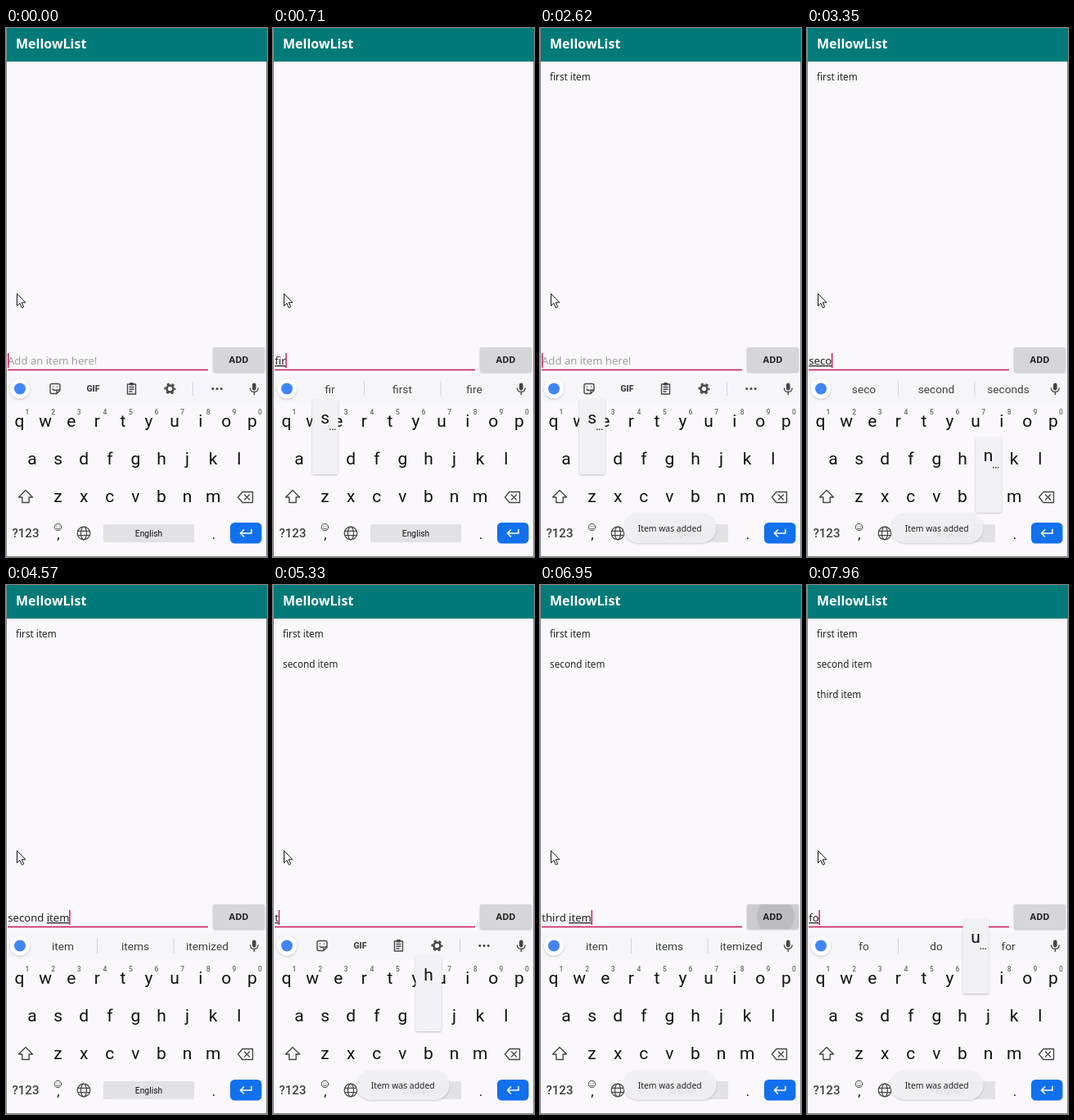
Write an HTML page that moves like this. It is 319 by 646 pixels and loops after 8000 ms.

```html
<!DOCTYPE html>
<html lang="en">
<head>
<meta charset="utf-8">
<title>To-do list</title>
<style>
  html, body { margin: 0; width: 100%; height: 100%; overflow: hidden; background: #faf8fc; }
  svg { display: block; width: 100%; height: 100%; }
  text { white-space: pre; }
  .app { font-family: "Noto Sans", sans-serif; fill: #222; }
  .kb { font-family: Roboto, sans-serif; fill: #111; }
  .mid { text-anchor: middle; }
  .key { font-size: 21px; }
  .hint { font-size: 8.5px; font-weight: 500; fill: #666; }
  .word { font-size: 13.7px; fill: #3c4043; }
  .line { fill: none; stroke: #444649; stroke-width: 1.4; stroke-linejoin: round; stroke-linecap: round; }
  .solid { fill: #444649; }
  .rule { stroke: #d3d3d9; stroke-width: 1; }
</style>
</head>
<body>
<svg viewBox="0 0 319 646">
  <defs>
    <filter id="shadow" x="-30%" y="-30%" width="160%" height="160%">
      <feDropShadow dx="0" dy="1" stdDeviation="1.2" flood-opacity=".25"/>
    </filter>
    <clipPath id="face"><rect x="253" y="390" width="63" height="30" rx="2"/></clipPath>
  </defs>

  <rect width="319" height="646" fill="#faf8fc"/>
  <path d="M.5 0v646M318.500 0v646M0 645.500h319" stroke="#85838a"/>
  <rect x="1" width="318" height="41" fill="#007a78"/>
  <text class="app" x="12" y="25" font-size="16" font-weight="700" style="fill:#fff">MellowList</text>
  <g id="list"></g>

  <text class="app" id="holder" x="2" y="411" font-size="13.100" style="fill:#a09ea3">Add an item here!</text>
  <text class="app" id="input" x="2.3" y="411" font-size="13.1"><tspan id="done"></tspan><tspan id="word" text-decoration="underline"></tspan></text>
  <rect x="2" y="416.700" width="245" height="1.600" fill="#c8235a"/>
  <rect id="caret" y="397" width="1.5" height="18" fill="#d01f56"/>

  <rect id="button" x="253" y="390" width="63" height="30" rx="2" filter="url(#shadow)"/>
  <circle id="ripple" cx="288" cy="405" r="23" fill="#bcbbbe" clip-path="url(#face)"/>
  <text class="app mid" x="284.5" y="409" font-size="11" font-weight="700">ADD</text>

  <rect x="2" y="424" width="315" height="34" fill="#f6f5fa"/>
  <circle cx="17" cy="440.5" r="12" fill="#fff" filter="url(#shadow)"/>
  <circle cx="17" cy="440.5" r="7" fill="#4285f4"/>
  <g id="tools">
    <path class="line" d="M56 434.500h8q2 0 2 2v6l-4 4h-6q-2 0-2-2v-8q0-2 2-2zM66 442h-2.500q-1.500 0-1.500 1.500v3M57 441q2 2.500 4.500 1"/>
    <path class="line" d="M57.500 438h.1M62.500 438h.1"/>
    <text class="kb mid" x="106.500" y="444" font-size="10.500" font-weight="900" style="fill:#444649">GIF</text>
    <path class="line" d="M148.500 435h10v12h-10zM151 438.500h5M151 441.300h5M151 444h3"/>
    <rect class="solid" x="151" y="433" width="5" height="3.500" rx="1"/>
    <circle class="line" cx="200.500" cy="440.500" r="4" style="stroke-width:2.500"/>
    <circle class="line" cx="200.500" cy="440.500" r="6" style="stroke-width:2;stroke-linecap:butt" stroke-dasharray="3.142 3.142" stroke-dashoffset="1.570"/>
    <path class="rule" d="M228.500 432v17"/>
    <g class="solid"><circle cx="252.800" cy="440.500" r="1.500"/><circle cx="258" cy="440.500" r="1.500"/><circle cx="263.200" cy="440.500" r="1.500"/></g>
  </g>
  <g id="words">
    <path class="rule" d="M111.500 431v19M205 431v19"/>
    <text class="kb mid word" x="69.500" y="445.500"></text>
    <text class="kb mid word" x="158" y="445.500"></text>
    <text class="kb mid word" x="246" y="445.500"></text>
  </g>
  <rect class="solid" x="301" y="433.500" width="4.600" height="9" rx="2.300"/>
  <path class="line" d="M298.500 440q.3 4.500 4.800 4.500t4.800-4.500M303.300 444.500v3"/>

  <g id="keys"></g>
  <path class="line" d="M24 564.500l8.500 8.500h-4.300v6.500h-8.400v-6.500h-4.300z"/>
  <path class="line" d="M289 566.500h12.500v13h-12.500l-5.500-6.500zM291.500 570l6 6M297.500 570l-6 6"/>
  <text class="kb mid" x="24" y="622" font-size="15" font-weight="500" style="fill:#3c4043">?123</text>
  <circle class="line" cx="63.500" cy="609.500" r="4.200" style="stroke-width:1"/>
  <path class="line" d="M61.500 611q2 2 4 0M62 608.300h.1M65 608.300h.1" style="stroke-width:1"/>
  <text class="kb mid" x="64" y="624" font-size="17">,</text>
  <g class="line" style="stroke-width:1.200">
    <circle cx="95" cy="617" r="7.800"/><ellipse cx="95" cy="617" rx="3.500" ry="7.800"/>
    <path d="M88 614.300h14M88 619.700h14"/>
  </g>
  <rect id="space" x="119" y="606" width="111" height="22" rx="1.500"/>
  <text class="kb mid" x="174.500" y="621" font-size="10.300">English</text>
  <text class="kb mid" x="254" y="624" font-size="17">.</text>
  <rect x="274" y="604" width="38.500" height="25.500" rx="5.500" fill="#1170ee"/>
  <path class="line" d="M300 612.500v4.500h-13.500M290.500 613l-4 4 4 4" style="stroke:#fff;stroke-width:1.700"/>

  <g id="popup">
    <rect x="-15.500" y="-79" width="31.500" height="91.500" rx="3" fill="#f1f1f6" filter="url(#shadow)"/>
    <text class="kb mid key" y="-50"></text>
    <path class="solid" d="M5.500-43h1.600v1.600h-1.600zM8.400-43h1.600v1.600h-1.600zM11.300-43h1.600v1.600h-1.600z"/>
  </g>
  <g id="toast">
    <rect x="102" y="592.500" width="113.500" height="36" rx="18" fill="#f0eff4" filter="url(#shadow)" opacity=".9"/>
    <text class="app mid" x="158.700" y="614.500" font-size="10.400">Item was added</text>
  </g>

  <path d="M13.500 324.500v14.800l3.400-3.200 2.500 5.600 2.300-1-2.500-5.500h4.600z" fill="#fff" stroke="#111"/>
</svg>
<script>
const LOOP = 8000;
const $ = id => document.getElementById(id);
const NS = "http://www.w3.org/2000/svg";

// [time, field text, pressed key, button look]
const steps = [
  [0, ""], [130, "", "f"], [280, "f", "i"], [430, "fi", "r"], [580, "fir", "s"],
  [720, "firs", "t"], [870, "first", " "], [1020, "first i", "t"], [1160, "first it", "e"],
  [1310, "first ite", "m"], [1440, "first item"],
  [1740, "", "", "down"], [1890, "", "", "fade"], [2030, ""],
  [2620, "", "s"], [2770, "s"], [2910, "s", "e"], [3060, "se", "c"], [3200, "sec", "o"],
  [3350, "seco", "n"], [3510, "secon", "d"], [3660, "second"], [3810, "second", " "],
  [3960, "second ", "i"], [4120, "second i", "t"], [4270, "second it", "e"],
  [4420, "second ite", "m"], [4570, "second item"], [4730, "second item", "", "ripple"],
  [4880, "", "", "down"], [5030, "", "", "fade"],
  [5180, "", "t"], [5330, "t", "h"], [5460, "th", "i"], [5610, "thi"], [5910, "thi", "r"],
  [6060, "thir", "d"], [6210, "third", " "], [6360, "third ", "i"], [6510, "third i", "t"],
  [6660, "third it", "e"], [6800, "third ite", "m"], [6950, "third item", "", "ripple"],
  [7100, "", "", "down"], [7250, "", "", "fade"],
  [7390, "", "f"], [7530, "f"], [7810, "f", "o"], [7960, "fo", "u"]
];

const items = [["first item", 1890], ["second item", 5030], ["third item", 7250]];
const guesses = {
  "": "time of one", i: "I in is", it: "it its it's", ite: "item items itemized", item: "item items itemized",
  f: "f for from", fi: "fi first fit", fir: "fir first fire", firs: "firs first firstly", first: "first firsts firstly",
  s: "s so is", se: "se see set", sec: "sec second secure", seco: "seco second seconds",
  secon: "secon second seconds", second: "second seconds secondary",
  th: "th the this", thi: "thi this think", thir: "thir third thirty", third: "third thirds thirdly",
  fo: "fo do for"
};
const fills = { down: "#b7b6b9", fade: "#c8c7ca", ripple: "#cccbce" };

function addText(parent, cls, x, y, str) {
  const el = document.createElementNS(NS, "text");
  el.setAttribute("class", cls);
  el.setAttribute("x", x);
  el.setAttribute("y", y);
  el.textContent = str;
  return parent.appendChild(el);
}

const keys = {};
[["qwertyuiop", 16.5, 486.5], ["asdfghjkl", 32, 532.5], ["zxcvbnm", 63.5, 579]].forEach(([row, left, y], r) => {
  [...row].forEach((ch, i) => {
    const x = left + i * 31.6;
    keys[ch] = { x, y };
    addText($("keys"), "kb mid key", x, y, ch);
    if (r === 0) addText($("keys"), "kb mid hint", x + 9.5, 471.5, (i + 1) % 10);
  });
});

const rows = items.map(([str], i) => {
  const el = addText($("list"), "app", 12, 63.5 + i * 37.3, str);
  el.setAttribute("font-size", 11.75);
  return el;
});

const show = (el, on) => el.setAttribute("display", on ? "inline" : "none");
const clamp = v => Math.max(0, Math.min(1, v));

function drawField(text) {
  const cut = text.lastIndexOf(" ") + 1;
  $("done").textContent = text.slice(0, cut);
  $("word").textContent = text.slice(cut);
  show($("holder"), !text);
  $("caret").setAttribute("x", 2 + (text ? $("input").getComputedTextLength() : 0));
}

// The strip reacts one step late when the field is nearly empty.
function drawStrip(text, before) {
  const typed = text.length > 1 ? text : before;
  show($("tools"), !typed);
  show($("words"), typed);
  if (!typed) return;
  const list = guesses[typed.split(" ").pop()].split(" ");
  $("words").querySelectorAll("text").forEach((el, i) => el.textContent = list[i]);
}

function drawPopup(key) {
  const spot = keys[key], popup = $("popup");
  show(popup, spot);
  $("space").setAttribute("fill", key === " " ? "#cfced3" : "#e2e1e5");
  if (!spot) return;
  popup.setAttribute("transform", `translate(${spot.x} ${spot.y})`);
  popup.querySelector("text").textContent = key;
  show(popup.querySelector("path"), "qwertyuiopasclnz".includes(key));
}

function draw(n) {
  const [t, text, key, look] = steps[n];
  drawField(text);
  drawStrip(text, n ? steps[n - 1][1] : "");
  drawPopup(key);
  $("button").setAttribute("fill", fills[look] || "#d6d5d8");
  show($("ripple"), look === "ripple");
  rows.forEach((el, i) => show(el, t >= items[i][1]));
  const alpha = items.map(([, at]) => clamp(Math.min((t - at + 80) / 200, (at + 2120 - t) / 200)));
  $("toast").setAttribute("opacity", Math.max(...alpha));
}

let last = -1;
function tick() {
  const t = performance.now() % LOOP;
  const n = steps.findLastIndex(s => s[0] <= t);
  if (n !== last) draw(last = n);
  requestAnimationFrame(tick);
}
tick();
</script>
</body>
</html>
```
